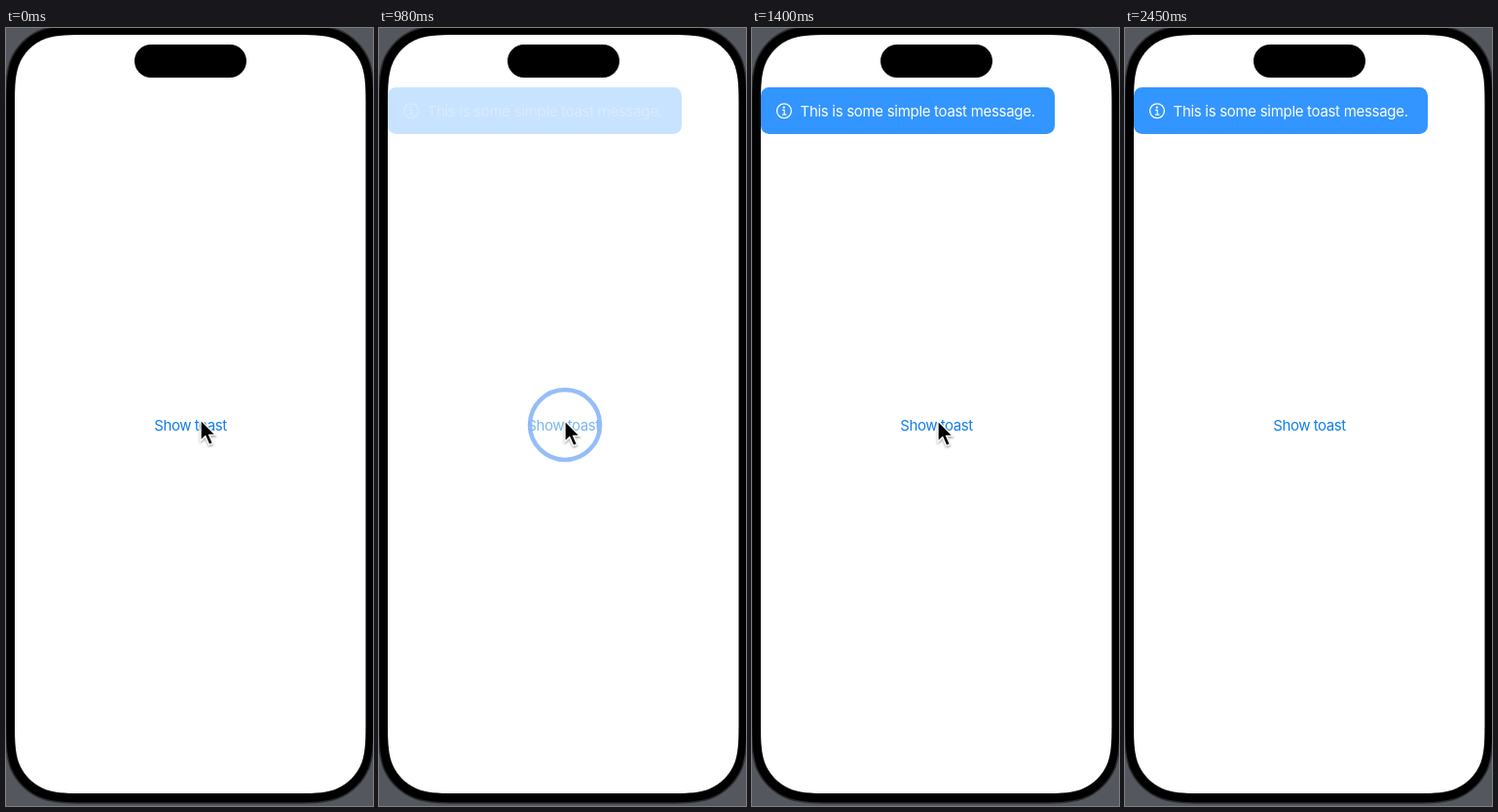
Write an HTML page that moves like this. It is 377 px wide and 800 px high and loops after 2800 ms.

```html
<!DOCTYPE html>
<html lang="en">
<head>
<meta charset="utf-8">
<title>Toast demo</title>
<style>
  html, body { margin: 0; height: 100%; overflow: hidden; background: #54585e; }
  svg { display: block; width: 377px; height: 800px; }
  text { font: 15px Inter, "Noto Sans", sans-serif; }

  /* One loop is 40 ticks of 70 ms, so each tick is 2.5% */
  .toast, .label, .button, .ring, .cursor { animation: 2.8s step-end infinite; }
  .toast, .label { animation-name: appear; }
  .button { animation-name: press; fill: #117ee8; letter-spacing: -.45px; text-anchor: middle; }
  .ring { animation-name: ripple; fill: none; stroke: #8ab6f9; }
  .cursor { animation-name: point; }
  .label text { fill: #fff; letter-spacing: -.3px; }

  @keyframes appear {
    0% { opacity: 0; }
    32.5% { opacity: .09; }
    35% { opacity: .27; }
    37.5% { opacity: .48; }
    40% { opacity: .68; }
    42.5% { opacity: .84; }
    45% { opacity: .94; }
    47.5% { opacity: .99; }
    50%, 100% { opacity: 1; }
  }
  @keyframes press {
    0% { opacity: 1; }
    32.5% { opacity: .3; }
    35% { opacity: .56; }
    37.5% { opacity: .8; }
    40% { opacity: .94; }
    42.5%, 100% { opacity: 1; }
  }
  @keyframes ripple {
    0% { opacity: 0; r: 29px; stroke-width: 5px; }
    32.5% { opacity: .65; r: 29.5px; stroke-width: 5px; }
    35% { opacity: .9; r: 36px; stroke-width: 4.5px; }
    37.5% { opacity: 1; r: 40px; stroke-width: 4px; }
    40% { opacity: .6; r: 42.5px; stroke-width: 3px; }
    42.5% { opacity: .25; r: 44px; stroke-width: 2px; }
    45%, 100% { opacity: 0; r: 45px; stroke-width: 1px; }
  }
  @keyframes point {
    0% { opacity: 1; transform: translate(200px, 403px); }
    2.5% { opacity: 1; transform: translate(196px, 403.4px); }
    5% { opacity: 1; transform: translate(192.5px, 403.8px); }
    7.5% { opacity: 1; transform: translate(191px, 404px); }
    62.5% { opacity: .8; transform: translate(191px, 404px); }
    65% { opacity: .5; transform: translate(191px, 404px); }
    67.5% { opacity: .2; transform: translate(191px, 404px); }
    70%, 100% { opacity: 0; transform: translate(191px, 404px); }
  }
</style>
</head>
<body>
<svg viewBox="0 0 377 800">
  <defs>
    <filter id="shadow" x="-50%" y="-50%" width="200%" height="200%">
      <feDropShadow dx="0" dy="1.5" stdDeviation="1.3" flood-opacity=".4"/>
    </filter>
  </defs>
  <path id="body" stroke="#2b2d30" stroke-width="1.5"/>
  <path id="screen" fill="#fff"/>
  <rect x="132" y="17" width="115" height="34" rx="17"/>

  <g class="toast">
    <rect x="9" y="61" width="302" height="48" rx="8.5" fill="#3395ff"/>
    <g class="label">
      <circle cx="33" cy="85.3" r="7.4" fill="none" stroke="#fff" stroke-width="1.3"/>
      <circle cx="32.8" cy="81.7" r="1.1" fill="#fff"/>
      <path d="M31.2 84.4h2v4.6M31 89.1h4.4" fill="none" stroke="#fff" stroke-width="1.2"/>
      <text x="49.5" y="90.7">This is some simple toast message.</text>
    </g>
  </g>

  <text class="button" x="189.5" y="414">Show toast</text>
  <circle class="ring" cx="191" cy="408"/>
  <g class="cursor">
    <path d="M0 0V21.2L4.8 16.7L8.7 25.5L12.4 23.9L8.6 15.3H15.1Z"
      stroke="#fff" stroke-width="1.3" filter="url(#shadow)"/>
  </g>
</svg>
<script>
  // Rectangle with continuous-curvature corners
  function squircle(x, y, w, h, r) {
    const corner = [[1.528, 0], [1.088, 0], [.868, 0], [.631, .075], [.373, .169],
      [.169, .373], [.075, .631], [0, .868], [0, 1.088], [0, 1.528]];
    const side = (flipX, flipY) => {
      const pts = corner.map(([u, v]) =>
        [flipX ? x + w - u * r : x + u * r, flipY ? y + h - v * r : y + v * r]);
      if (flipX !== flipY) pts.reverse();
      return pts[0] + "C" + pts.slice(1).join(" ");
    };
    return "M" + [side(0, 0), side(0, 1), side(1, 1), side(1, 0)].join("L") + "Z";
  }
  const shape = (id, ...box) =>
    document.getElementById(id).setAttribute("d", squircle(...box));
  shape("body", -.5, -3, 378.5, 800, 60);
  shape("screen", 9, 7, 360.5, 780, 51);
</script>
</body>
</html>
```
